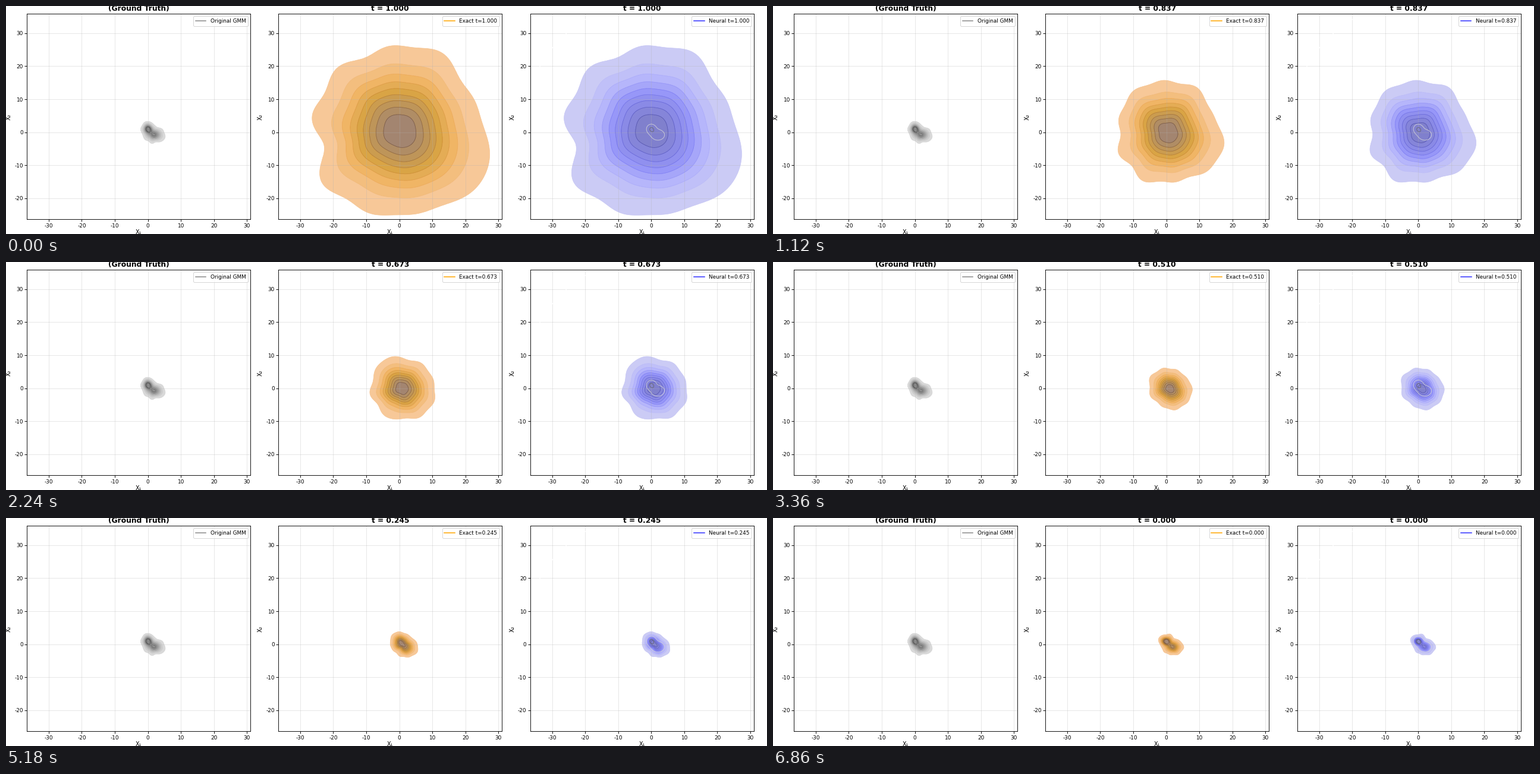
These frames come from a looping animation (1280x384 px, 7 s). A matplotlib script:

```python
import numpy as np
import matplotlib.pyplot as plt
from matplotlib.animation import FuncAnimation
from matplotlib.colors import LinearSegmentedColormap

W, H, DPI = 1280, 384, 100
FRAMES, STEP_MS = 50, 140
PX = 0.72                      # points per pixel
N = 110                        # density grid resolution
SIGMA = 25.0                   # diffusion strength

plt.rcParams.update({
    "font.family": "DejaVu Sans",
    "axes.unicode_minus": False,
    "axes.linewidth": 0.65,
    "patch.linewidth": 0.7,
    "xtick.major.width": 0.65, "ytick.major.width": 0.65,
    "xtick.major.size": 2.6, "ytick.major.size": 2.6,
    "xtick.major.pad": 2.2, "ytick.major.pad": 2.2,
    "xtick.labelsize": 8.9 * PX, "ytick.labelsize": 8.9 * PX,
})

# Mixture: weight, mean, variances
MIX = [(0.4, (0.0, 1.0), (0.9, 0.9)), (0.6, (2.0, -0.8), (2.0, 1.25))]
MU = sum(w * np.array(m) for w, m, _ in MIX)
COV = sum(w * (np.diag(v) + np.outer(m - MU, m - MU)) for w, m, v in MIX)

PROPORTIONS = np.linspace(0.05, 1, 10)[:-1]

# Bulges of the widest cloud: direction in degrees, relative height
LOBES = [(70, 0.07), (142, 0.08), (240, 0.09), (334, 0.16)]


def ramp(*colors):
    """Nine fill colours and the deeper line colours that go with them."""
    cmap = LinearSegmentedColormap.from_list("ramp", colors)
    fill = cmap(np.linspace(0, 1, 9))[:, :3]
    return fill, fill ** np.linspace(1.1, 1.9, 9)[:, None]


GRAY = ramp("#d9d9d9", "#c4c4c4", "#b0b0b0", "#9a9a9a", "#828282")
ORANGE = ramp("#f7c898", "#f0b565", "#d9a445", "#be9559", "#a38570")
BLUE = ramp("#cbcbf5", "#b6b6fb", "#9797f8", "#8a8ae6", "#8080cd")


def wobble(rng, th, orders, size):
    """Random smooth function of the angle."""
    amp = rng.normal(0, size / np.sqrt(len(orders)), (len(orders), 2))
    return sum(a * np.cos(k * th) + b * np.sin(k * th)
               for k, (a, b) in zip(orders, amp))


def lobes(th):
    return sum(h * np.exp(12 * (np.cos(th - np.radians(a)) - 1))
               for a, h in LOBES) - 0.045


def mixture(x, y, noise=0.0):
    z = 0
    for w, m, v in MIX:
        a, b = v[0] + noise, v[1] + noise
        z = z + w / (2 * np.pi * np.sqrt(a * b)) * np.exp(
            -(x - m[0]) ** 2 / (2 * a) - (y - m[1]) ** 2 / (2 * b))
    return z


def density(t, seed):
    """Diffused mixture at time t, bent as an estimate from samples would be."""
    rng = np.random.default_rng(seed)
    noise = 1.15 * (SIGMA ** (2 * t) - 1) / (2 * np.log(SIGMA))
    half = 3.4 * np.sqrt(np.trace(COV) / 2 + noise)
    axis = np.linspace(-half, half, N)
    dx, dy = np.meshgrid(axis, axis)
    r, th = np.hypot(dx, dy), np.arctan2(dy, dx)

    # Radius of the 5 % contour, then its irregular rim
    inv = np.linalg.inv(COV + noise * np.eye(2))
    c, s = np.cos(th), np.sin(th)
    rim = np.sqrt(-2 * np.log(0.05) / (
        inv[0, 0] * c ** 2 + 2 * inv[0, 1] * c * s + inv[1, 1] * s ** 2))
    bend = lobes(th) * t ** 2 + wobble(rng, th, range(3, 11), 0.03)
    core = wobble(rng, th, range(2, 6), 0.05)
    shift = rng.normal(0, 0.05, 2) * np.sqrt(noise)

    u2 = np.clip(r / (rim * (1 + bend)), 0, 1) ** 2
    k = 1 + bend * u2 + core * (1 - u2)
    z = mixture(MU[0] + dx / k - shift[0] * (1 - u2),
                MU[1] + dy / k - shift[1] * (1 - u2), noise)
    center = MU * (1 - t ** 4)
    return dx + center[0], dy + center[1], z


def draw_density(ax, field, colors):
    """Filled contours that leave equal steps of mass outside."""
    v = np.sort(field[2].ravel())
    lv = v[np.searchsorted(np.cumsum(v) / v.sum(), PROPORTIONS)]
    fill, line = colors
    return [ax.contourf(*field, levels=[*lv, v[-1] * 1.001], colors=list(fill),
                        antialiased=True, zorder=1),
            ax.contour(*field, levels=lv, colors=list(line),
                       linewidths=0.5, zorder=2)]


fig = plt.figure(figsize=(W / DPI, H / DPI), dpi=DPI, facecolor="white")


def panel(left, title, label, color):
    ax = fig.add_axes([left / W, 1 - 359.2 / H, 376 / W, 346.2 / H])
    ax.set_xlim(-36.6, 31.1)
    ax.set_ylim(-26.33, 35.88)
    ax.set_xticks(range(-30, 31, 10))
    ax.set_yticks(range(-20, 31, 10))
    ax.set_axisbelow("line")
    ax.grid(True, color="#b0b0b0", alpha=0.3, linewidth=0.7)
    mid = (left + 188) / W
    head = fig.text(mid, 1 - 8 / H, title, ha="center", va="baseline",
                    fontsize=12.3 * PX, weight="bold")
    fig.text(mid, 0, "X₁", ha="center", va="baseline", fontsize=9.6 * PX)
    fig.text((left - 30.5) / W, 1 - 187 / H, "X₂", rotation=90,
             ha="center", va="center", fontsize=9.6 * PX)
    ax.plot([], [], color=color, lw=1.1, label=label)
    legend = ax.legend(loc="upper right", fontsize=8.9 * PX)
    return ax, head, legend.get_texts()[0]


ax_true, _, _ = panel(35.3, "(Ground Truth)", "Original GMM", "#8a8a8a")
ax_exact, head_exact, key_exact = panel(458.3, "t = 1.000", "Exact t=1.000", "orange")
ax_neural, head_neural, key_neural = panel(882.1, "t = 1.000", "Neural t=1.000", "#3030ff")

draw_density(ax_true, density(0, 3), GRAY)

# Reference contours over the neural panel
gx, gy = np.meshgrid(np.linspace(-4, 7, 140), np.linspace(-5, 5, 140))
ax_neural.contour(gx, gy, mixture(gx, gy), levels=[0.022, 0.066],
                  colors=["0.85", "0.4"], linewidths=0.7, alpha=0.8, zorder=3)
arc = np.radians(np.linspace(118, 162, 60))
ax_neural.plot(38.7 * np.cos(arc), 1 + 38.7 * np.sin(arc), color="white",
               lw=0.9, zorder=2)

shown = []


def reset():
    while shown:
        shown.pop().remove()
    return []


def update(i):
    reset()
    t = 1 - i / (FRAMES - 1)
    field = density(t, [5, i])
    shown.extend(draw_density(ax_exact, field, ORANGE))
    shown.extend(draw_density(ax_neural, field, BLUE))
    for head in (head_exact, head_neural):
        head.set_text(f"t = {t:.3f}")
    key_exact.set_text(f"Exact t={t:.3f}")
    key_neural.set_text(f"Neural t={t:.3f}")
    return []


anim = FuncAnimation(fig, update, frames=FRAMES, init_func=reset,
                     interval=STEP_MS, repeat=True, repeat_delay=0, blit=False)
plt.show()
```
